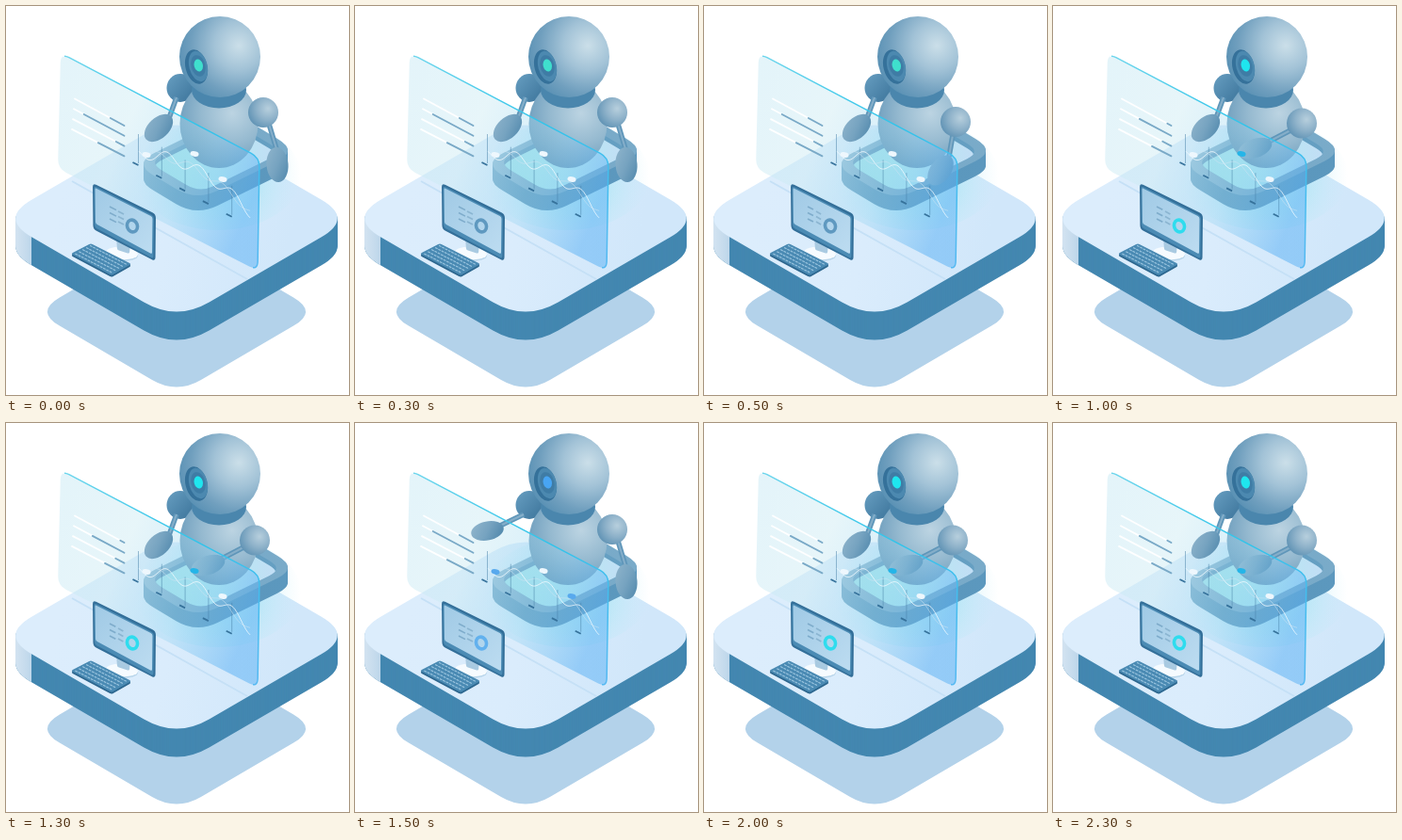
Recreate the animation shown at these times as an HTML page with a canvas. Size 364 by 413 pixels, loop 2.5 s.

```html
<!DOCTYPE html>
<html lang="en">
<head>
<meta charset="utf-8">
<title>Robot at the data panel</title>
<style>
html, body { margin: 0; width: 100%; height: 100%; overflow: hidden; background: #fff; }
canvas { display: block; }
</style>
</head>
<body>
<canvas id="stage" width="364" height="413"></canvas>
<script>
const ctx = document.getElementById('stage').getContext('2d');
const STEP = 500;

// Arms: shoulder, forearm ends, hand centre, hand radii, hand angle
const armDown = { shoulder: [273, 113], from: [279, 125], to: [288, 155], hand: [288, 168.5], size: [11.5, 18.5], tilt: -0.08 };
const armBent = { shoulder: [267, 123], from: [264, 137], to: [260, 160], hand: [251, 174.5], size: [11, 18], tilt: 0.62 };
const armAcross = { shoulder: [264, 124.5], from: [252, 132], to: [229, 144], hand: [214.5, 151], size: [18.5, 10], tilt: -0.33 };
const leftRest = { from: [181, 97], to: [173, 119], hand: [162, 129.5], size: [18, 11], tilt: -0.75 };
const leftReach = { from: [179, 97], to: [154, 109], hand: [140.5, 114.5], size: [17.5, 10], tilt: -0.2 };

const longBars = [0.72, 0.2, 0.84, 0.5];
const shortBars = [0.92, 0.37, 0.83, 0.63];
const rest = { right: armDown, left: leftRest, eye: '#3fdfcd', ring: '#5f99c0', bars: longBars, lit: [], dash: 1 };
const bent = { ...rest, right: armBent, dash: 0.85 };
const across = { ...rest, right: armAcross, eye: '#1fe6ef', ring: '#2fdcee', bars: shortBars, lit: [1], dash: 0.9 };
const reach = { ...rest, left: leftReach, eye: '#48a5f3', ring: '#62b1ee', lit: [0, 2] };
const poses = [rest, bent, across, reach, across];

function addStops(gradient, colors) {
  colors.forEach((c, i) => gradient.addColorStop(i / (colors.length - 1), c));
  return gradient;
}

const linear = (x0, y0, x1, y1, ...colors) => addStops(ctx.createLinearGradient(x0, y0, x1, y1), colors);
const radial = (x, y, r, ...colors) => addStops(ctx.createRadialGradient(x, y, 0, x, y, r), colors);

function roundPoly(points, r) {
  const path = new Path2D();
  points.forEach((p, i) => {
    const toward = q => {
      const k = r / Math.hypot(q[0] - p[0], q[1] - p[1]);
      return [p[0] + (q[0] - p[0]) * k, p[1] + (q[1] - p[1]) * k];
    };
    path[i ? 'lineTo' : 'moveTo'](...toward(points.at(i - 1)));
    path.quadraticCurveTo(...p, ...toward(points[(i + 1) % points.length]));
  });
  path.closePath();
  return path;
}

const rhombus = (x, y, w, h, r) => roundPoly([[x, y - h], [x + w, y], [x, y + h], [x - w, y]], r);

function fill(path, color) {
  ctx.fillStyle = color;
  ctx.fill(path);
}

function line(color, width, ...points) {
  ctx.strokeStyle = color;
  ctx.lineWidth = width;
  ctx.beginPath();
  points.forEach(p => ctx.lineTo(...p));
  ctx.stroke();
}

function ellipse(x, y, rx, ry, tilt, color) {
  ctx.fillStyle = color;
  ctx.beginPath();
  ctx.ellipse(x, y, rx, ry, tilt, 0, Math.PI * 2);
  ctx.fill();
}

function extrude(path, depth, color) {
  ctx.save();
  ctx.translate(0, depth);
  for (let i = depth; i > 0; i--) {
    fill(path, color);
    ctx.translate(0, -1);
  }
  ctx.restore();
}

function drawPlatform() {
  fill(rhombus(181, 324.5, 150, 87.5, 30), '#b3d2ea');
  const top = rhombus(181, 225.5, 188, 109, 40);
  extrude(top, 30, '#4387b0');
  ctx.save();
  ctx.beginPath();
  ctx.rect(0, 200, 27, 100);
  ctx.clip();
  extrude(top, 30, linear(10, 0, 27, 0, '#d3e3f1', '#bdd6ea'));
  ctx.restore();
  fill(top, linear(60, 190, 300, 250, '#dcedfc', '#daecfc', '#d1e7fa'));
  line('#c5e0f6', 2, [70, 186], [256, 290]);
}

function drawDock() {
  ellipse(225, 180, 88, 58, 0, radial(225, 180, 88, 'rgba(125,225,238,.65)', 'rgba(150,230,240,.4)', 'rgba(190,235,250,0)'));
  const corners = [[243, 114], [310, 154], [202, 207], [135, 167]];
  const inset = (k, dy) => corners.map(([x, y]) => [222 + (x - 222) * k, 160 + (y - 160) * k + dy]);
  const rim = roundPoly(corners, 25);
  extrude(rim, 16, linear(145, 0, 299, 0, '#6ca4c6', '#5b97bc', '#5c98be'));
  fill(rim, linear(145, 0, 299, 0, '#8ab8d3', '#76a9c8', '#7aabc9'));
  const well = roundPoly(inset(0.82, 0), 17);
  fill(well, '#659fc2');
  ctx.save();
  ctx.clip(well);
  fill(roundPoly(inset(0.82, 5), 17), linear(160, 0, 290, 0, '#9de1ea', '#b4eaf2', '#c3ddf5'));
  ctx.restore();
}

function drawArm(arm) {
  const [hx, hy] = arm.hand;
  line('#5f96b9', 5.5, arm.from, arm.to);
  line('#85aec9', 2, arm.from, arm.to);
  const r = Math.max(...arm.size);
  ellipse(hx, hy, ...arm.size, arm.tilt, linear(hx - r, hy - 8, hx + r, hy + 8, '#91b6cd', '#76a3c0', '#4c85aa'));
}

function drawRobot(pose) {
  ellipse(185, 87, 14.5, 15, 0, linear(171, 76, 196, 98, '#649bbe', '#41799f'));
  ellipse(226, 125, 41.5, 47, 0, radial(240, 114, 64, '#bcd4e2', '#96bad0', '#6799ba'));
  ellipse(226, 89, 29, 19.5, 0, '#4a86ad');
  ellipse(227, 54, 43, 43, 0, radial(247, 42, 76, '#cbdfe9', '#a3c3d7', '#709fbe', '#4b88ae'));
  ellipse(202, 64.5, 11.5, 18.5, -0.25, '#35719a');
  ellipse(204, 64, 9.6, 16.5, -0.25, '#4c89b0');
  ellipse(204, 63.5, 7.5, 11.5, -0.25, '#3f7ca5');
  ellipse(204.3, 63, 4.6, 6.6, -0.25, pose.eye);
  const [sx, sy] = pose.right.shoulder;
  drawArm(pose.right);
  ellipse(sx, sy, 16, 16, 0, radial(sx + 5, sy - 4, 24, '#b7cfdd', '#8db1c9', '#5a8fb2'));
}

function drawBars(starts) {
  ctx.lineCap = 'round';
  starts.forEach((start, i) => {
    const a = [73 - i, 98.5 + i * 10.8];
    const b = [125.5, 127 + i * 10.8];
    const mid = [a[0] + (b[0] - a[0]) * start, a[1] + (b[1] - a[1]) * start];
    line('rgba(255,255,255,.95)', 1.8, a, mid);
    line('#79a9c7', 1.8, mid, b);
  });
  ctx.lineCap = 'butt';
}

function drawChart(lit) {
  for (let i = 0; i < 5; i++) {
    const x = 140.5 + i * 24.8;
    const y = 167 + i * 13.7;
    line('rgba(74,130,168,.65)', 0.8, [x, y - 31], [x, y]);
    line('#37739c', 1.8, [x - 6, y - 1], [x, y + 2]);
  }
  const wave = (phase, height) => Array.from({ length: 60 }, (_, i) => [
    141 + i * 2,
    157 + 64 * (i / 60) ** 2 + height * Math.sin(i / 2.8 + phase)
  ]);
  line('rgba(245,251,255,.75)', 1, ...wave(5.8, 6));
  line('rgba(205,228,242,.6)', 0.9, ...wave(7.6, 4));
  [[149, 158], [200, 157], [230, 184]].forEach(([x, y], i) => {
    ellipse(x, y, 4.6, 2.7, 0.2, lit.includes(i) ? (i === 1 ? '#24b5e8' : '#58a9ed') : '#eef7fd');
  });
}

function drawPanel(pose) {
  const glass = roundPoly([[58, 50], [269, 161], [267, 281], [55, 172.5]], 10);
  fill(glass, linear(58, 100, 268, 190, 'rgba(195,231,243,.45)', 'rgba(205,235,243,.48)', 'rgba(145,210,240,.33)', 'rgba(91,177,244,.53)'));
  drawArm(pose.left);
  ctx.save();
  ctx.beginPath();
  [[62, 45], [280, 45], [280, 285], [262, 285], [262, 170], [62, 64]].forEach(p => ctx.lineTo(...p));
  ctx.clip();
  ctx.lineWidth = 1.5;
  ctx.strokeStyle = linear(60, 50, 270, 275, '#6fd6ec', '#2fc4ea', '#55b9f2');
  ctx.stroke(glass);
  ctx.restore();
  drawBars(pose.bars);
  drawChart(pose.lit);
}

function drawMonitor(pose) {
  ellipse(123, 264, 17, 6.5, 0.08, '#b8d5ea');
  ellipse(123, 262.5, 17, 6.5, 0.08, '#f6fbff');
  fill(roundPoly([[117, 244], [132, 251], [131, 263], [118, 259]], 2), '#a9cae1');
  fill(roundPoly([[92, 188], [159, 221], [158.5, 271], [92.5, 237]], 4), '#336f99');
  fill(roundPoly([[93.5, 191], [157, 223], [156.5, 268.5], [94, 235]], 3), '#4b8bb4');
  fill(roundPoly([[94.5, 193], [155.5, 224], [155, 263.5], [95, 231]], 2), linear(96, 200, 156, 255, '#a2cbe6', '#bbdbf0'));
  for (let row = 0; row < 3; row++) {
    const y = 213 + row * 6.5;
    line('#7eaccb', 1.6, [110, y], [110 + 7 * pose.dash, y + 3.6 * pose.dash]);
    line('#8bb5d1', 1.6, [119, y + 5 - row], [119 + 6 * pose.dash, y + 8 - row]);
  }
  ctx.strokeStyle = pose.ring;
  ctx.lineWidth = 3.6;
  ctx.beginPath();
  ctx.ellipse(134, 233.5, 5.4, 6.5, -0.35, 0, Math.PI * 2);
  ctx.stroke();
}

function drawKeyboard() {
  const board = roundPoly([[90, 252], [133, 274], [112, 286], [69, 263]], 2);
  extrude(board, 2, '#2d678f');
  fill(board, '#4a8ab3');
  for (let row = 0; row < 5; row++) {
    for (let col = 0; col < 12; col++) {
      const x = 89 - row * 3.9 + col * 3.3;
      const y = 254.3 + row * 2.15 + col * 1.7;
      line('#9cc6e0', 1.1, [x, y], [x + 2.5, y + 1.3]);
    }
  }
}

function draw(time) {
  const pose = poses[Math.floor(time / STEP) % poses.length];
  ctx.fillStyle = '#fff';
  ctx.fillRect(0, 0, 364, 413);
  drawPlatform();
  drawDock();
  drawRobot(pose);
  drawPanel(pose);
  drawMonitor(pose);
  drawKeyboard();
}

const begin = performance.now();
function tick() {
  draw(performance.now() - begin);
  requestAnimationFrame(tick);
}
tick();
</script>
</body>
</html>
```
